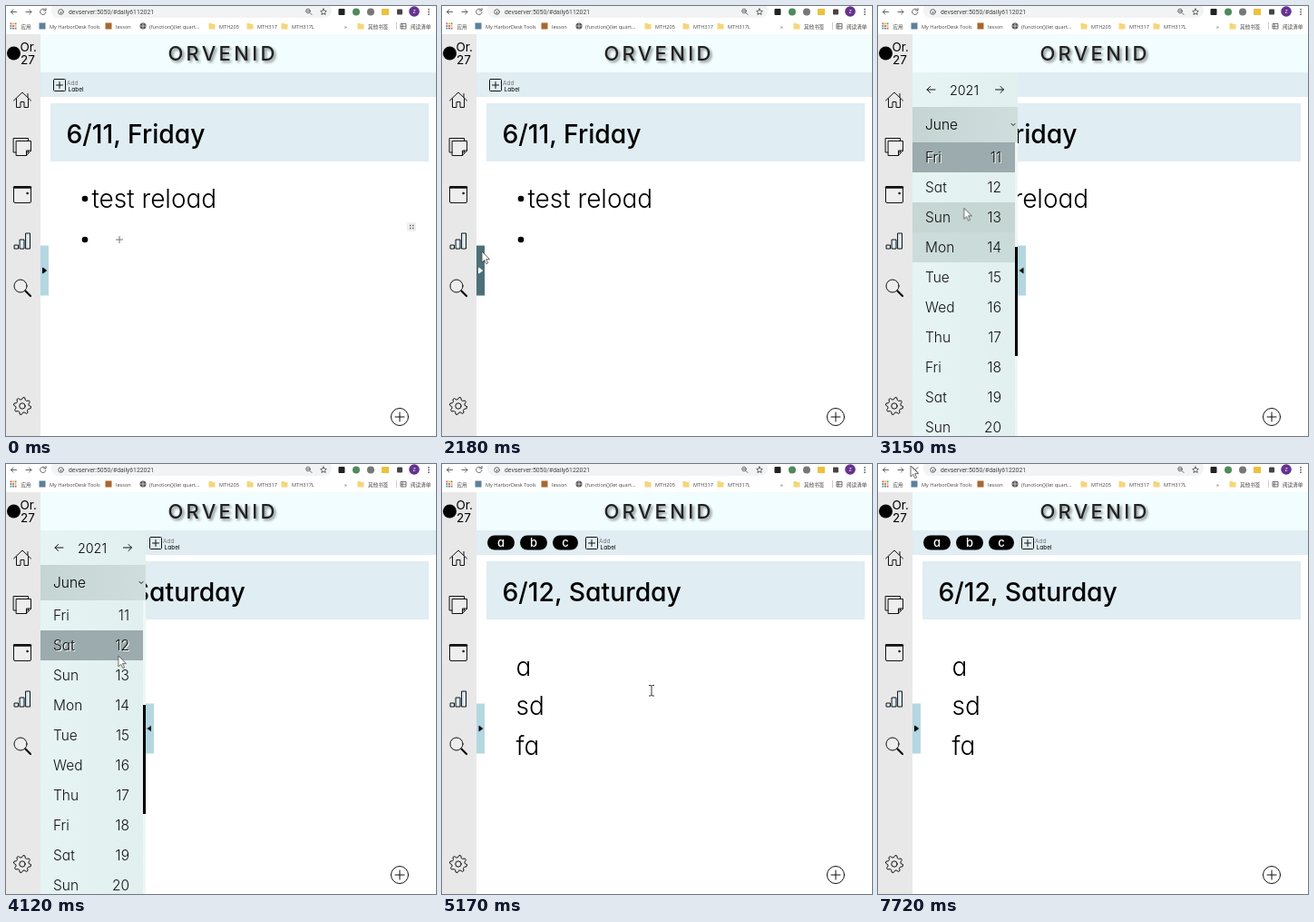
An HTML page for the animation above (8 s loop, 474 by 473 pixels).

```html
<!DOCTYPE html>
<html lang="en">
<head>
<meta charset="utf-8">
<title>Journal</title>
<style>
html, body { margin: 0; width: 100%; height: 100%; overflow: hidden; background: #fff; }
svg { display: block; width: 474px; height: 473px; }
text { font-family: Inter, "Open Sans", sans-serif; font-feature-settings: "cv11"; white-space: pre; }
.chrome text { font: 5.6px "Open Sans", "Noto Sans CJK SC", "Noto Sans CJK", sans-serif; fill: #444; }
.chrome .url { font: 6.8px Roboto, sans-serif; fill: #444; }
.big { font-size: 28px; font-weight: 300; }
.date { font-size: 28.3px; font-weight: 500; }
.row { font-size: 15.5px; font-weight: 300; }
.year { font-size: 14.3px; font-weight: 300; }
.tiny { font-size: 6.5px; }
.line { fill: none; stroke: #111; stroke-width: 1; stroke-linejoin: round; stroke-linecap: round; }

.anim, .pre, .post, .load, .idle, .tools { animation: 8s linear infinite; }
.pre { animation-name: leave; animation-timing-function: step-end; }
.post { animation-name: enter; animation-timing-function: step-end; }
.idle { animation-name: idle; animation-timing-function: step-end; }
.load { animation-name: load; animation-timing-function: step-end; }
.tools { animation-name: tools; animation-timing-function: step-end; }
@keyframes leave { 0% { opacity: 1 } 45.6%, 100% { opacity: 0 } }
@keyframes enter { 0% { opacity: 0 } 45.6%, 100% { opacity: 1 } }
@keyframes idle { 0% { opacity: 1 } 95.4%, 100% { opacity: 0 } }
@keyframes load { 0% { opacity: 0 } 95.4%, 100% { opacity: 1 } }
@keyframes tools { 0% { opacity: 1 } 20.1%, 100% { opacity: 0 } }

#panel { animation-name: slide; }
@keyframes slide {
  0% { transform: translateX(-116px) }
  28.1% { transform: translateX(-116px); animation-timing-function: ease }
  34.35% { transform: none }
  58.4% { transform: none; animation-timing-function: ease }
  64.65%, 100% { transform: translateX(-116px) }
}
#tab { animation-name: tab; }
@keyframes tab {
  0%, 24% { fill: #b4d7e1 }
  25.4%, 28.1% { fill: #4c6f78 }
  30.5% { fill: #9fc2ca }
  33%, 100% { fill: #b4d7e1 }
}
#tip { animation-name: tip, spin; }
@keyframes tip {
  0%, 24% { fill: #000 }
  25.4%, 28.1% { fill: #fff }
  29.5%, 100% { fill: #000 }
}
@keyframes spin {
  0% { transform: none }
  28.1% { transform: none; animation-timing-function: ease }
  40.1%, 58.4% { transform: rotate(-180deg) }
  59.9% { transform: rotate(-340deg) }
  64.65%, 100% { transform: rotate(-360deg) }
}
.hover1 { animation-name: sat; }
.hover2 { animation-name: sun; }
.hover3 { animation-name: mon; }
@keyframes mon { 0%, 28.5% { opacity: 0 } 30%, 38.2% { opacity: 1 } 40.6%, 100% { opacity: 0 } }
@keyframes sun { 0%, 38.2% { opacity: 0 } 39.6%, 41% { opacity: .75 } 43%, 100% { opacity: 0 } }
@keyframes sat { 0%, 41% { opacity: 0 } 43%, 45.6% { opacity: 1 } 46.5%, 100% { opacity: 0 } }

#cursor { animation-name: move; }
@keyframes move {
  0%, 6.24% { transform: translate(480px, 480px) }
  6.25% { transform: translate(471px, 470px) }
  7.5%, 9.87% { transform: translate(468px, 468px) }
  14% { transform: translate(300px, 380px) }
  17% { transform: translate(155px, 277px) }
  18.5% { transform: translate(68px, 222px) }
  19.6% { transform: translate(50px, 210px) }
  21.5% { transform: translate(38px, 232px) }
  24% { transform: translate(42px, 262px) }
  27%, 27.6% { transform: translate(44px, 270px) }
  31.7% { transform: translate(46px, 274px) }
  36% { transform: translate(50px, 273px) }
  38.2% { transform: translate(72px, 250px) }
  39.4% { transform: translate(95px, 222px) }
  41.5%, 50.6% { transform: translate(100px, 202px) }
  55% { transform: translate(215px, 245px) }
  56.5%, 68% { transform: translate(231px, 249px) }
  70.7%, 72% { transform: translate(198px, 181px) }
  75.2% { transform: translate(184px, 142px) }
  80% { transform: translate(14px, 22px) }
  81.4%, 82.6% { transform: translate(26px, 11px) }
  89.4%, 100% { transform: translate(36px, 2px) }
}
#beam { animation: beam 8s step-end infinite; }
#arrow { animation: arrow 8s step-end infinite; }
@keyframes beam { 0% { opacity: 0 } 29% { opacity: 1 } 34% { opacity: 0 } 53% { opacity: 1 } 78.5%, 100% { opacity: 0 } }
@keyframes arrow { 0% { opacity: 1 } 29% { opacity: 0 } 34% { opacity: 1 } 53% { opacity: 0 } 78.5%, 100% { opacity: 1 } }
</style>
</head>
<body>
<svg viewBox="0 0 474 473">
  <defs>
    <linearGradient id="mint"><stop offset="0" stop-color="#e6f4f3"/><stop offset="1" stop-color="#e1f0ef"/></linearGradient>
    <linearGradient id="moss"><stop offset="0" stop-color="#c5d5d3"/><stop offset="1" stop-color="#cfdedc"/></linearGradient>
    <g id="add">
      <rect class="line" x="52.5" y="80.5" width="13" height="13" rx="1"/>
      <path class="line" d="M55.5 87h7M59 83.5v7"/>
      <text class="tiny" x="67" y="86.5" fill="#777">Add</text>
      <text class="tiny" x="68.5" y="93.5">Label</text>
    </g>
    <path id="folder" d="M-3.5 -3h3l1 1h3v5.5h-7z" fill="#f6d67a"/>
  </defs>

  <!-- page -->
  <rect width="474" height="473" fill="#fff"/>
  <rect x="38" y="31" width="436" height="42" fill="#f1fdfe"/>
  <text x="239" y="60" font-size="22" font-weight="500" letter-spacing="3.3" text-anchor="middle" fill="#222"
    style="filter:drop-shadow(2px 2px 1.5px #0007)">ORVENID</text>
  <rect x="38" y="73" width="436" height="27" fill="#e0edf2"/>
  <rect x="49" y="107" width="417" height="64" fill="#e0edf2"/>
  <g class="pre">
    <use href="#add"/>
    <text class="date" x="66.5" y="150.5">6/11, Friday</text>
    <circle cx="87" cy="212" r="3.3"/>
    <circle cx="87" cy="257" r="3.3"/>
    <text class="big" x="94.5" y="222">test reload</text>
  </g>
  <g class="tools">
    <path d="M121 257h8M125 253v8" stroke="#777"/>
    <rect x="442" y="238" width="10" height="10" rx="1.5" fill="#eee"/>
    <path d="M445 241.5h1.5M448 241.5h1.5M445 244.5h1.5M448 244.5h1.5" stroke="#666" stroke-width="1.5"/>
  </g>
  <g class="post">
    <g id="pills"></g>
    <use href="#add" x="106"/>
    <text class="date" x="66.5" y="150.5">6/12, Saturday</text>
    <text class="big" x="81.5" y="233">a</text>
    <text class="big" x="81.5" y="276">sd</text>
    <text class="big" x="81.5" y="320">fa</text>
  </g>
  <circle class="line" cx="434" cy="452" r="9.5"/>
  <path class="line" d="M429 452h10M434 447v10"/>

  <!-- calendar drawer, drawn open -->
  <g id="panel" class="anim">
    <rect x="38" y="73" width="116" height="400" fill="url(#mint)"/>
    <rect x="151" y="150" width="3" height="323" fill="#f0f6f6"/>
    <path class="line" d="M63 92h-9m3.5-3.5l-3.5 3.5l3.5 3.5M129.500 92h9m-3.5-3.5l3.5 3.5l-3.5 3.5"/>
    <text class="year" x="79" y="98">2021</text>
    <rect x="38" y="111" width="116" height="39" fill="url(#moss)"/>
    <text class="row" x="52" y="136">June</text>
    <path class="line" d="M147 129.5l2 2l2-2"/>
    <g id="rows"></g>
    <rect x="151" y="265" width="3" height="120"/>
    <rect id="tab" class="anim" x="154" y="263.5" width="9" height="55"/>
    <g transform="translate(158.5 291)"><path id="tip" class="anim" d="M-2-3.5L2.8 0L-2 3.5z"/></g>
  </g>

  <!-- left rail -->
  <rect y="31" width="38" height="442" fill="#e8e8e8"/>
  <circle cx="8.5" cy="52" r="7.5"/>
  <text x="15.5" y="49.5" font-size="13.5">Or.</text>
  <text x="16" y="64" font-size="13.5">27</text>
  <g class="line">
    <path d="M8.5 104L18 95L27.500 104M24 100.500v-4M11.500 102v9.500h4.500v-6h4v6h4.500v-9.5"/>
    <path fill="#e8e8e8" d="M8.500 145.500h16v15.500h-16z"/>
    <path fill="#eee" d="M11.500 148.500h16v10.500l-5 5.500h-11zM27.500 159h-5v5.500"/>
    <rect x="8.500" y="198.500" width="19" height="18" rx="1.500" fill="#eee"/>
    <path d="M9 199.500h18" stroke-width="2.500"/>
    <circle cx="23.500" cy="206" r=".8" fill="#111"/>
    <path fill="#d8ecf5" d="M9.500 263h4v4h-4zM15.500 257h4.500v10h-4.500zM22 250h4.500v17h-4.500z"/>
    <circle cx="16" cy="308" r="7" fill="#eee"/>
    <path d="M21.500 313.500l5.500 5.500" stroke-width="2.200"/>
    <path id="gear"/>
    <circle cx="18" cy="440" r="3.200"/>
  </g>

  <!-- browser bars -->
  <g class="chrome">
    <rect width="474" height="31" fill="#fff"/>
    <rect x="50" y="-4" width="309" height="17" rx="8" fill="#f1f3f4"/>
    <g class="line" style="stroke:#555;stroke-width:.9">
      <path d="M11.500 6.500h-6m2.500-2.500l-2.500 2.500l2.500 2.500"/>
      <path d="M22 6.500h6m-2.500-2.500l2.500 2.500l-2.500 2.500"/>
      <path class="idle" d="M43.500 4.500a3.200 3.200 0 1 0 .5 2.500M44 2.500v2.500h-2.500"/>
      <path class="load" d="M38 3.500l6 6m0-6l-6 6"/>
      <circle cx="60.500" cy="6.500" r="2.800"/>
      <path d="M60.500 6.300v1.700"/>
      <circle cx="333" cy="5.500" r="2.300"/>
      <path d="M335 7.500l2 2M332 5.500h2"/>
      <path d="M350 3l1 2.200l2.300.3l-1.700 1.600l.5 2.400l-2.100-1.200l-2.100 1.200l.5-2.400l-1.700-1.600l2.300-.3z"/>
    </g>
    <text class="url pre" x="69" y="9">devserver:5050/#daily6112021</text>
    <text class="url post" x="69" y="9">devserver:5050/#daily6122021</text>
    <rect x="366.500" y="3" width="7" height="7" rx="1" fill="#222"/>
    <circle cx="386" cy="6.500" r="4" fill="#4d8a5c"/>
    <circle cx="402" cy="6.500" r="4" fill="#777"/>
    <rect x="414" y="3" width="8" height="7" fill="#ecc23c"/>
    <rect x="431" y="3.500" width="6" height="6" rx="1" fill="#444"/>
    <circle cx="450" cy="6" r="5.800" fill="#65328f"/>
    <text x="450" y="8.300" text-anchor="middle" style="fill:#fff">Z</text>
    <path d="M466 3v1.400M466 5.800v1.400M466 8.600v1.400" stroke="#444" stroke-width="1.400"/>
    <g id="apps"></g>
    <text x="16.500" y="24.500">应用</text>
    <rect x="36.500" y="18.500" width="7" height="7" fill="#5d8099"/>
    <text x="48" y="24.500">My HarborDesk Tools</text>
    <rect x="109.500" y="18.500" width="7" height="7" fill="#a8672f"/>
    <text x="121" y="24.500">lesson</text>
    <circle cx="151" cy="22" r="3.500" fill="#555"/>
    <path d="M148 22h6M151 19v6" stroke="#fff" stroke-width=".6"/>
    <text x="158" y="24.500">(function(){let quart...</text>
    <use href="#folder" x="227" y="22"/><text x="235" y="24.500">MTH205</text>
    <use href="#folder" x="269" y="22"/><text x="277" y="24.500">MTH317</text>
    <use href="#folder" x="307" y="22"/><text x="315" y="24.500">MTH317L</text>
    <text x="373" y="24.500">»</text>
    <use href="#folder" x="391" y="22"/><text x="399" y="24.500">其他书签</text>
    <path d="M430.500 18v8" stroke="#ccc"/>
    <path d="M435 19.500h6v5.500h-6zM435 22.300h6M437 19.500v5.500" fill="none" stroke="#555" stroke-width=".8"/>
    <text x="446" y="24.500">阅读清单</text>
  </g>

  <g id="cursor" class="anim">
    <path id="arrow" d="M0 0v12l2.800-2.600l2 4.300l1.900-.9l-2-4.200h3.800z" fill="#fff" stroke="#444" stroke-width=".8"/>
    <path id="beam" d="M-3-5.500h2.200l.8.800l.8-.8h2.200M-3 6h2.200l.8-.8l.8.800h2.200M0-5v10.500" fill="none" stroke="#333"/>
  </g>
</svg>
<script>
const fill = (id, html) => document.getElementById(id).innerHTML = html;
const range = n => [...Array(n).keys()];

fill("pills", ["a", "b", "c"].map((c, i) => {
  const x = 50 + 36 * i, w = i < 2 ? 30 : 28;
  return `<rect x="${x}" y="78.5" width="${w}" height="16" rx="8"/>
    <text x="${x + w / 2}" y="91" font-size="13" font-weight="500" text-anchor="middle" fill="#fff">${c}</text>`;
}).join(""));

const days = ["Sun", "Mon", "Tue", "Wed", "Thu", "Fri", "Sat"];
fill("rows", range(10).map(i => {
  const y = 150 + 33 * i;
  const bar = (cls, color) => `<rect class="${cls}" x="38" y="${y}" width="113" height="33" fill="${color}"/>`;
  const label = (d, color) => `<text class="row" x="${52 + d}" y="${y + 22 + d}" fill="${color}">${days[(i + 5) % 7]}</text>
    <text class="row" x="${136 + d}" y="${y + 22 + d}" text-anchor="end" fill="${color}">${11 + i}</text>`;
  const hover = i > 0 && i < 4 ? bar("anim hover" + i, "#b5c6c3") : "";
  const picked = i < 2 ? `<g class="${i ? "post" : "pre"}">${bar("", "#9babae")}${label(1.2, "#fff")}</g>` : "";
  return hover + picked + label(0, "#111");
}).join(""));

const appColors = ["#d9534a", "#e9b63c", "#4c9a5f", "#4a7fd0"];
fill("apps", range(9).map(i =>
  `<rect x="${4.5 + i % 3 * 2.6}" y="${18.5 + Math.floor(i / 3) * 2.6}" width="1.8" height="1.8" fill="${appColors[i % 4]}"/>`).join(""));

// eight-toothed gear outline
const teeth = range(32).map(i => {
  const a = (i + .5) * Math.PI / 16, r = i % 4 < 2 ? 9.5 : 7.2;
  return `${(18 + r * Math.cos(a)).toFixed(1)} ${(440 + r * Math.sin(a)).toFixed(1)}`;
});
document.getElementById("gear").setAttribute("d", `M${teeth.join("L")}z`);
</script>
</body>
</html>
```
